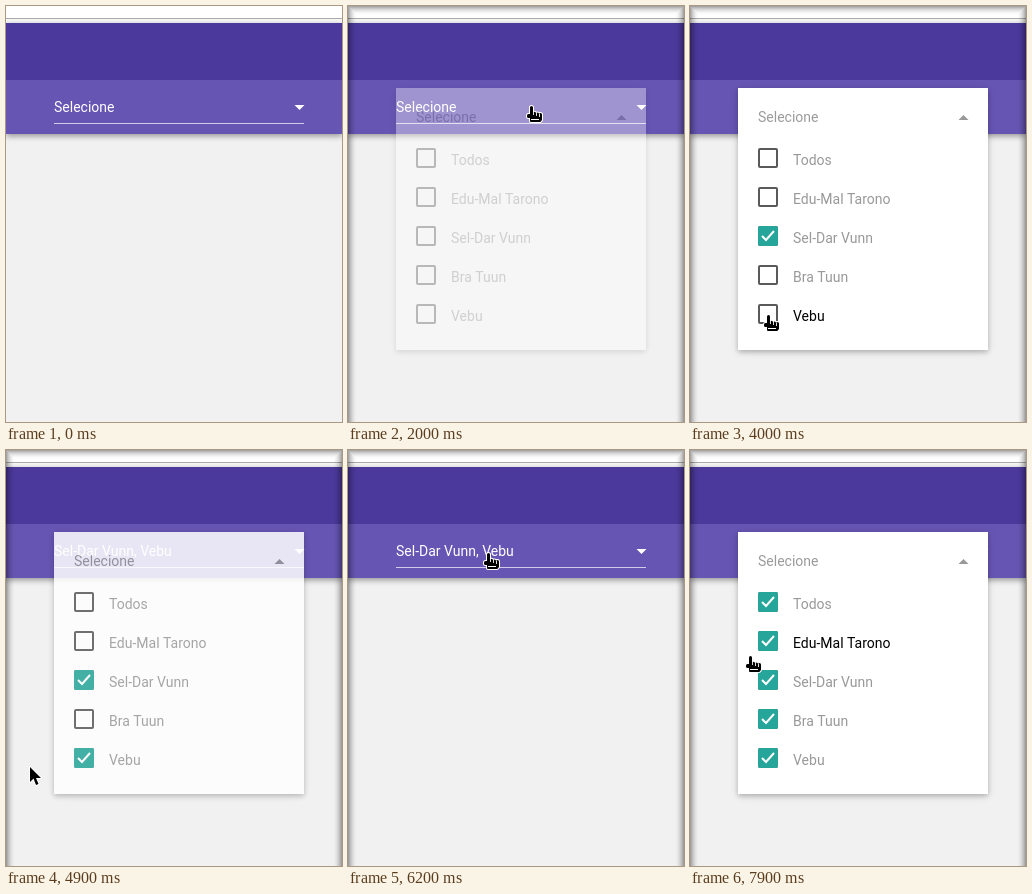
Animation of 336 by 416 pixels, one loop 8 s. Source, as an HTML page with a canvas:

```html
<!DOCTYPE html>
<html lang="pt">
<head>
<meta charset="utf-8">
<title>Select</title>
<style>
  html, body { margin: 0; width: 100%; height: 100%; overflow: hidden; background: #f1f1f1; }
  canvas { display: block; width: 336px; height: 416px; }
</style>
</head>
<body>
<canvas id="stage" width="336" height="416"></canvas>
<script>
const W = 336, H = 416, LOOP = 8000, STEP = 100;
const PANEL = { x: 48, y: 82, w: 250, h: 262 };
const PROMPT = 'Selecione';
const ctx = document.getElementById('stage').getContext('2d');
const layer = document.createElement('canvas');
layer.width = W;
layer.height = H;
const pane = layer.getContext('2d');

// Each option with the time it gets ticked
const rows = [
  { label: 'Todos', check: 7500 },
  { label: 'Edu-Mal Tarono', check: 7500 },
  { label: 'Sel-Dar Vunn', check: 3300 },
  { label: 'Bra Tuun', check: 7500 },
  { label: 'Vebu', check: 4200 }
];
const rowY = i => 142 + 39 * i;
const onBox = i => ({ x: 78, y: rowY(i) + 11 });

const ENTRY = { x: 205, y: 312 };
const moves = [
  { from: 700, to: 1500, x: 183, y: 100 },
  { from: 2200, to: 3000, ...onBox(2) },
  { from: 3400, to: 3900, ...onBox(4) },
  { from: 4200, to: 4600, x: 24, y: 317 },
  { from: 5500, to: 6200, x: 140, y: 103 },
  { from: 6400, to: 7100, ...onBox(0) },
  { from: 7500, to: 7900, x: 60, y: 206 }
];

const clamp = v => Math.max(0, Math.min(1, v));
const smooth = p => p * p * (3 - 2 * p);

function rect(c, x, y, w, h, color) {
  c.fillStyle = color;
  c.fillRect(x, y, w, h);
}

function text(c, str, x, y, color) {
  c.font = '400 14px Roboto, Arial, sans-serif';
  c.fillStyle = color;
  c.fillText(str, x, y);
}

// Triangle with a 10px base at y; dir 1 points down, -1 up
function caret(c, x, y, dir, color) {
  c.beginPath();
  c.moveTo(x - 5, y);
  c.lineTo(x + 5, y);
  c.lineTo(x, y + 5 * dir);
  c.fillStyle = color;
  c.fill();
}

function shadowed(c, x, y, w, h, color, blur, alpha) {
  c.save();
  c.shadowColor = `rgba(0,0,0,${alpha})`;
  c.shadowBlur = blur;
  c.shadowOffsetY = 2;
  rect(c, x, y, w, h, color);
  c.restore();
}

function pointerAt(t) {
  let { x, y } = ENTRY;
  for (const m of moves) {
    const p = smooth(clamp((t - m.from) / (m.to - m.from)));
    x += (m.x - x) * p;
    y += (m.y - y) * p;
  }
  return { x: Math.round(x), y: Math.round(y) };
}

function openness(t) {
  if (t < 2000 || (t >= 5200 && t < 6500)) return 0;
  if (t >= 4900 && t < 5200) return 1 - (t - 4850) / 340;
  const start = t < 4900 ? 1957 : 6457;
  return 1 - Math.pow(1 - clamp((t - start) / 300), 3);
}

const overPanel = ({ x }) => x >= PANEL.x && x <= PANEL.x + PANEL.w;

function hoveredRow(t) {
  const tip = pointerAt(t);
  return openness(t) && overPanel(tip) ? Math.floor((tip.y - 134) / 39) : -1;
}

// Label colour follows the hover with a short lag
function hoverAmount(i, t) {
  const lag = 3;
  let hits = 0;
  for (let k = 0; k < lag; k++) hits += hoveredRow(t - k * STEP) === i;
  return hits / lag;
}

function drawPage(t) {
  rect(ctx, 0, 0, W, H, '#f1f1f1');
  rect(ctx, 0, 0, W, 12, '#fff');
  rect(ctx, 0, 12, W, 1, '#ababab');
  rect(ctx, 0, 13, W, 4, '#f8f8f8');
  shadowed(ctx, 0, 17, W, 111, '#6655b3', 6, .4);
  rect(ctx, 0, 17, W, 57, '#4b399b');
  const picked = rows.filter(r => t >= r.check && r.check < 7500).map(r => r.label);
  text(ctx, picked.join(', ') || PROMPT, 48, 106, '#fff');
  rect(ctx, 48, 117, 250, 1, 'rgba(255,255,255,.7)');
  caret(ctx, 293.5, 99, 1, '#fff');
}

function drawBox(x, y, p) {
  pane.strokeStyle = '#5a5a5a';
  pane.lineWidth = 2;
  pane.beginPath();
  pane.roundRect(x + 1, y + 1, 18, 18, 1);
  pane.stroke();
  if (!p) return;
  pane.save();
  pane.translate(x + 10, y + 10);
  pane.scale(p, p);
  pane.fillStyle = '#26a69a';
  pane.beginPath();
  pane.roundRect(-10, -10, 20, 20, 2);
  pane.fill();
  pane.strokeStyle = '#fff';
  pane.beginPath();
  pane.moveTo(-6, 0);
  pane.lineTo(-2, 4);
  pane.lineTo(6, -5);
  pane.stroke();
  pane.restore();
}

function drawPanel(t) {
  const alpha = openness(t);
  if (!alpha) return;
  const { x, y, w, h } = PANEL;
  pane.clearRect(0, 0, W, H);
  shadowed(pane, x, y, w, h, '#fff', 5, .22);
  shadowed(pane, x, y, w, h, '#fff', 9, .1);
  text(pane, PROMPT, 68, 116, '#9b9b9b');
  caret(pane, 273.5, 114, -1, '#999');
  rows.forEach((row, i) => {
    const shade = Math.round(153 * (1 - hoverAmount(i, t)));
    drawBox(68, rowY(i), clamp((t - row.check + STEP) / 200) * (t >= row.check));
    text(pane, row.label, 103, rowY(i) + 17, `rgb(${shade},${shade},${shade})`);
  });
  ctx.globalAlpha = alpha;
  ctx.drawImage(layer, 0, 0);
  ctx.globalAlpha = 1;
}

function handPath() {
  const p = new Path2D();
  p.roundRect(-1, 0, 3, 12, 1.5);
  for (let i = 1; i < 4; i++) p.roundRect(3 * i - 1, 5 + i * .7, 3, 8, 1.5);
  p.roundRect(-4, 8, 5, 4, 1.5);
  p.roundRect(-1, 8, 11, 8, 1);
  return p;
}

function arrowPath() {
  return new Path2D('M0 0V15L3.5 11.5 6 18 8.5 17 6 11H11Z');
}

const HAND = handPath(), ARROW = arrowPath();

function drawPointer(t) {
  if (t < moves[0].from) return;
  const tip = pointerAt(t);
  const bottom = openness(t) > .9 ? PANEL.y + PANEL.h : 118;
  const hand = overPanel(tip) && tip.y >= PANEL.y && tip.y <= bottom;
  const shape = hand ? HAND : ARROW;
  ctx.save();
  ctx.translate(tip.x, tip.y);
  ctx.lineJoin = 'round';
  ctx.lineWidth = 2;
  ctx.strokeStyle = '#fff';
  ctx.stroke(shape);
  ctx.fillStyle = '#000';
  ctx.fill(shape);
  if (hand) {
    for (let i = 0; i < 3; i++) rect(ctx, 2 + 3 * i, 6 + i, 1, 3, '#ddd');
    rect(ctx, 0, 13, 8, 1, '#fff');
  }
  ctx.restore();
}

// Inner shadow on the top and sides; the lower edge falls off stage
function drawEdge() {
  const depth = 9;
  ctx.lineWidth = 1;
  for (let i = 0; i < depth; i++) {
    ctx.strokeStyle = `rgba(0,0,0,${.35 * (1 - i / depth) ** 2})`;
    ctx.strokeRect(i + .5, i + .5, W - 2 * i - 1, H + depth);
  }
}

function frame(now) {
  const t = Math.floor((now % LOOP) / STEP) * STEP;
  drawPage(t);
  drawPanel(t);
  drawPointer(t);
  if (t >= STEP) drawEdge();
}

let origin;
function tick(now) {
  origin ??= now;
  frame(Math.max(0, now - origin));
  requestAnimationFrame(tick);
}
requestAnimationFrame(tick);
</script>
</body>
</html>
```
